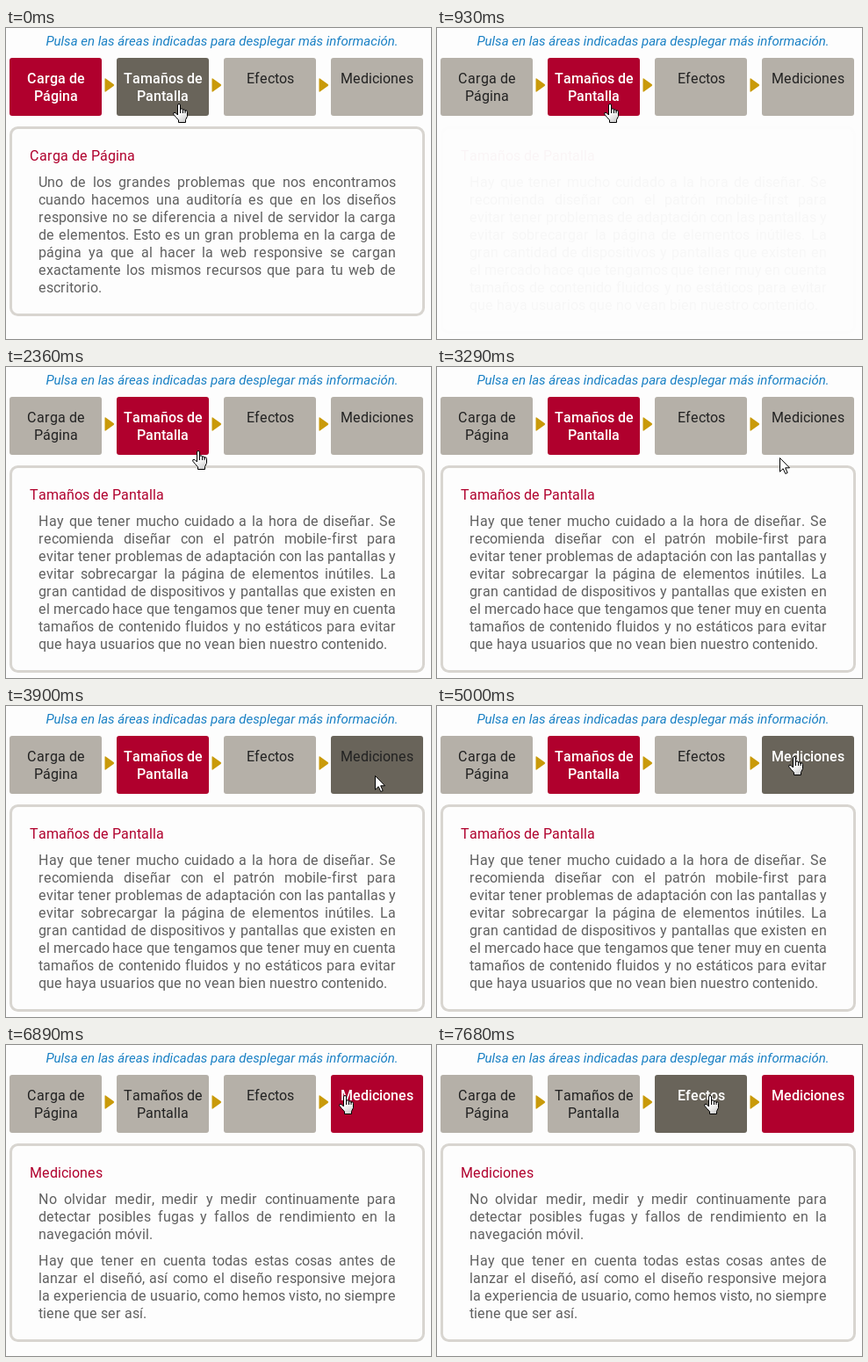
An HTML page with a canvas that plays this animation: 484 by 354 pixels, repeating every 8 s.

```html
<!DOCTYPE html>
<html lang="es">
<head>
<meta charset="utf-8">
<title>Diseño responsive</title>
<style>
html, body { margin: 0; width: 100%; height: 100%; overflow: hidden; background: #fdfdfd; }
canvas { display: block; }
</style>
</head>
<body>
<canvas id="stage" width="484" height="354"></canvas>
<script>
const ctx = document.getElementById('stage').getContext('2d');
const LOOP = 8000, STEP = 120, FADE = 150, TAB_W = 105, LINE = 20;
const RED = '#b0002d', GREY = '#b5b0a8', DARK = '#69645a';

const tabs = [['Carga de', 'Página'], ['Tamaños de', 'Pantalla'], ['Efectos'], ['Mediciones']];

// One list of paragraphs per tab
const panes = {
  0: [[
    'Uno de los grandes problemas que nos encontramos',
    'cuando hacemos una auditoría es que en los diseños',
    'responsive no se diferencia a nivel de servidor la carga',
    'de elementos. Esto es un gran problema en la carga de',
    'página ya que al hacer la web responsive se cargan',
    'exactamente los mismos recursos que para tu web de',
    'escritorio.']],
  1: [[
    'Hay que tener mucho cuidado a la hora de diseñar. Se',
    'recomienda diseñar con el patrón mobile-first para',
    'evitar tener problemas de adaptación con las pantallas y',
    'evitar sobrecargar la página de elementos inútiles. La',
    'gran cantidad de dispositivos y pantallas que existen en',
    'el mercado hace que tengamos que tener muy en cuenta',
    'tamaños de contenido fluidos y no estáticos para evitar',
    'que haya usuarios que no vean bien nuestro contenido.']],
  3: [[
    'No olvidar medir, medir y medir continuamente para',
    'detectar posibles fugas y fallos de rendimiento en la',
    'navegación móvil.'], [
    'Hay que tener en cuenta todas estas cosas antes de',
    'lanzar el diseñó, así como el diseño responsive mejora',
    'la experiencia de usuario, como hemos visto, no siempre',
    'tiene que ser así.']]
};

// lag: how far the fade has run when the tab first turns red
const clicks = [
  { time: 930, from: 0, to: 1, lag: 155 },
  { time: 5380, from: 1, to: 3, lag: 45 }
];

// Pointer strokes: start time, steps, end x, end y
const strokes = [
  [2240, 2, 218, 95], [2510, 3, 305, 103], [2930, 4, 390, 103], [3410, 3, 422, 87],
  [3780, 2, 420, 79], [4600, 2, 412, 67], [4880, 2, 406, 57], [6240, 1, 405, 57],
  [6520, 4, 385, 57], [7020, 2, 354, 57], [7300, 4, 310, 57]
];

const arrowPath = new Path2D('M.5 .5V16.2L4.2 12.7L6.8 18.5L9.2 17.4L6.7 11.8H11.5Z');
const handPath = new Path2D('M5.5 13V2Q5.5 .5 7 .5T8.5 2V7Q8.5 5.8 10 5.8T11.5 7.2V8' +
  'Q11.5 6.8 12.8 6.8T14 8.2V9Q14 7.8 15.2 7.8T16.5 9.5V14.5L14.5 18.5V21.5H6.5V18.8' +
  'L3.5 15.5L.8 12.2Q.2 10.2 2 10.2Q3.4 10.4 5.5 13Z');
const knuckles = new Path2D('M8.5 6.5V11M11.5 7.5V11M14 8.5V11');
const marker = new Path2D('M.5 1Q.5 0 1.5 .5L10.6 7Q11.8 8 10.6 9L1.5 15.5Q.5 16 .5 15Z');

const shade = ctx.createLinearGradient(4, 6, 14, 22);
shade.addColorStop(.3, '#fff');
shade.addColorStop(1, '#c8c8c8');

const tabX = i => 4 + 122 * i;
const setFont = weight => { ctx.font = weight + ' 16px Roboto, sans-serif'; };

// Whole-pixel glyph advances
const advance = ch => Math.round(ctx.measureText(ch).width + .1);
const widthOf = s => [...s].reduce((w, ch) => w + advance(ch), 0);

function drawText(s, x, y, gap = 0) {
  for (const ch of s) {
    ctx.fillText(ch, Math.round(x), y);
    x += advance(ch) + (ch === ' ' ? gap : 0);
  }
}

function pointerAt(t) {
  let x = 196, y = 86;
  for (const [start, steps, endX, endY] of strokes) {
    if (t < start) break;
    const p = Math.min(1, (Math.floor((t - start) / STEP) + 1) / steps);
    x += (endX - x) * p;
    y += (endY - y) * p;
  }
  return { x, y };
}

function paneAt(t) {
  const click = clicks.filter(c => c.time <= t).pop();
  if (!click) return { active: 0, pane: 0, alpha: 1 };
  const tick = 125;
  const run = click.lag + tick * Math.floor((t - click.time) / tick);
  const fadingOut = run < FADE;
  return {
    active: click.to,
    pane: fadingOut ? click.from : click.to,
    alpha: Math.min(1, Math.abs(run / FADE - 1))
  };
}

function drawTab(i, active, over, linked) {
  const x = tabX(i), light = active || linked;
  ctx.fillStyle = active ? RED : over ? DARK : GREY;
  ctx.beginPath();
  ctx.roundRect(x, 34, TAB_W, 66, 3);
  ctx.fill();
  ctx.fillStyle = light ? '#fff' : '#222';
  setFont(light ? 500 : 400);
  tabs[i].forEach((s, n) => drawText(s, x + (TAB_W - widthOf(s)) / 2, 63 + LINE * n));
  if (i < tabs.length - 1) {
    ctx.save();
    ctx.translate(x + 108, 57);
    ctx.fillStyle = '#c99a0a';
    ctx.fill(marker);
    ctx.restore();
  }
}

function drawPane(id, alpha) {
  ctx.globalAlpha = alpha;
  setFont(400);
  ctx.fillStyle = RED;
  drawText(tabs[id].join(' '), 27, 151);
  ctx.fillStyle = '#606060';
  let y = 181;
  for (const lines of panes[id]) {
    lines.forEach((s, n) => {
      const last = n === lines.length - 1;
      const gap = last ? 0 : (407 - widthOf(s)) / (s.split(' ').length - 1);
      drawText(s, 37, y, gap);
      y += LINE;
    });
    y += 10;
  }
  ctx.strokeStyle = '#d8d5d0';
  ctx.lineWidth = 3;
  ctx.beginPath();
  ctx.roundRect(5.5, 113.5, 470, y - 118, 8);
  ctx.stroke();
  ctx.globalAlpha = 1;
}

function drawPointer({ x, y }, hand) {
  const shape = hand ? handPath : arrowPath;
  ctx.save();
  ctx.translate(Math.round(hand ? x - 6 : x), Math.round(y));
  ctx.fillStyle = hand ? shade : '#fff';
  ctx.strokeStyle = '#000';
  ctx.lineWidth = 1;
  ctx.fill(shape);
  ctx.stroke(shape);
  if (hand) ctx.stroke(knuckles);
  ctx.restore();
}

function draw(t) {
  const { active, pane, alpha } = paneAt(t);
  const tip = pointerAt(t);
  const over = tabs.findIndex((_, i) =>
    tip.y < 100 && tip.x >= tabX(i) && tip.x < tabX(i) + TAB_W);
  const hand = over >= 0 && tip.y < 59 + LINE * tabs[over].length;

  ctx.fillStyle = '#fdfdfd';
  ctx.fillRect(0, 0, 484, 354);
  ctx.font = 'italic 15px Roboto, sans-serif';
  ctx.fillStyle = '#1a80c4';
  ctx.textAlign = 'center';
  ctx.fillText('Pulsa en las áreas indicadas para desplegar más información.', 246, 20);
  ctx.textAlign = 'left';
  tabs.forEach((_, i) => drawTab(i, i === active, i === over, i === over && hand));
  drawPane(pane, alpha);
  drawPointer(tip, hand);
}

function tick() {
  draw(performance.now() % LOOP);
  requestAnimationFrame(tick);
}
tick();
</script>
</body>
</html>
```
